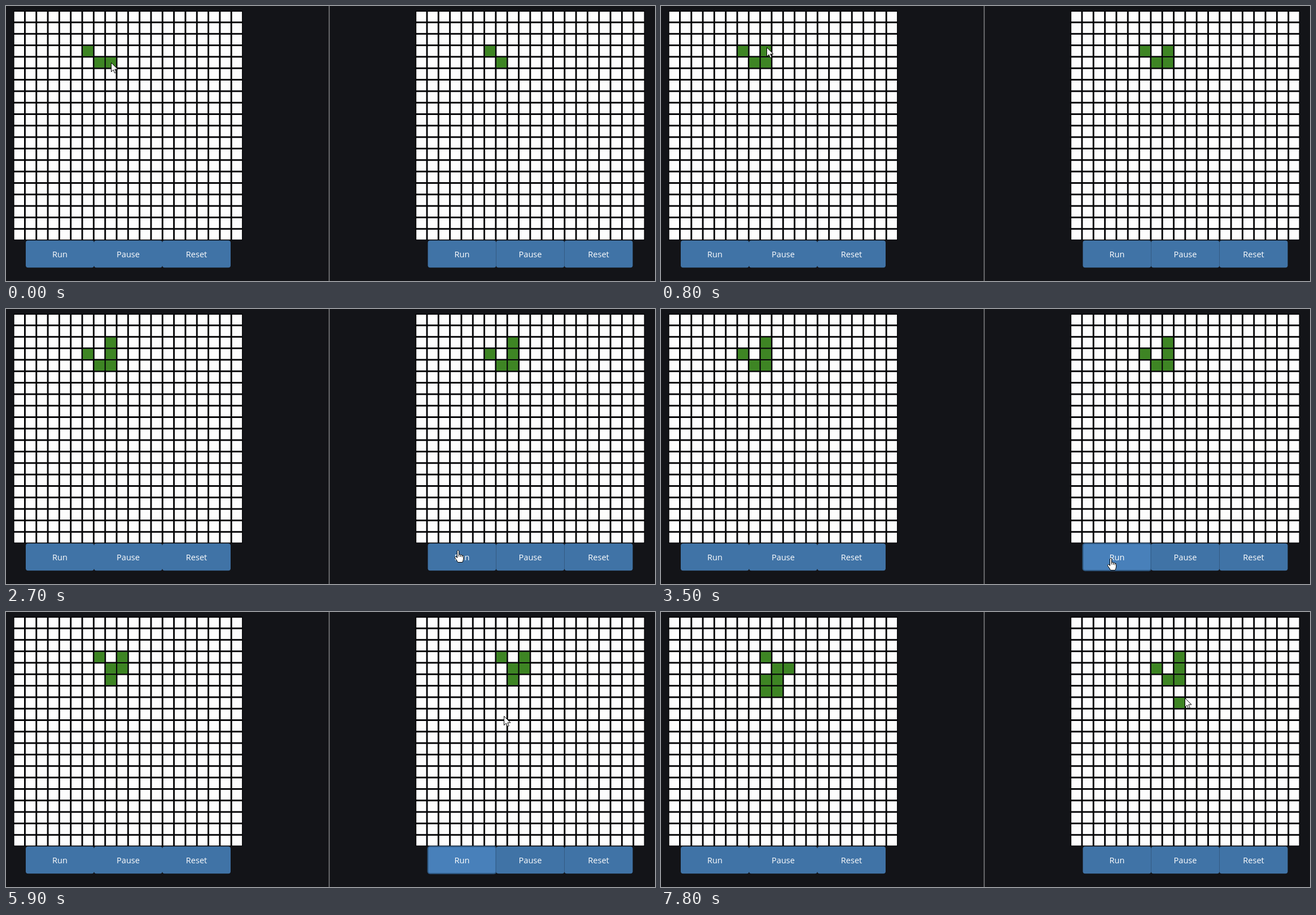
Recreate the animation shown at these times as an HTML page. Size 1150x487 px, loop 8000 ms.

```html
<!DOCTYPE html>
<html lang="en">
<head>
<meta charset="utf-8">
<title>Game of Life</title>
<style>
  html, body { margin: 0; height: 100%; overflow: hidden; background: #131418; }
  svg { display: block; }
  text { font: 14.6px "Open Sans", "Noto Sans", sans-serif; fill: #fff; text-anchor: middle; }
</style>
</head>
<body>
<svg id="stage" width="1150" height="487" viewBox="0 0 1150 487"></svg>
<script>
const LOOP = 8000, SIZE = 20, PITCH = 20.32, CELL = 17.4;
const stage = document.getElementById('stage');

function add(tag, attrs, text) {
  const el = document.createElementNS('http://www.w3.org/2000/svg', tag);
  for (const k in attrs) el.setAttribute(k, attrs[k]);
  if (text) el.textContent = text;
  return stage.appendChild(el);
}

// Board events: [time, column, row] clicks a cell, [time] advances one generation.
const boards = [
  { x: 14.6, start: [[6, 3], [7, 4], [8, 4]],
    events: [[600, 8, 3], [1300, 8, 2], [4200], [5200], [5900], [6900], [7800, 9, 7], [7800]] },
  { x: 727.1, start: [[6, 3], [7, 4]],
    events: [[200, 8, 4], [700, 8, 3], [1500, 8, 2], [3700], [4800], [5900], [6800], [7700, 9, 7]] }
];

// Pointer positions, each held until the next: [time, x, y]
const path = [
  [0, 186, 100], [100, 186, 97], [200, 187, 88], [300, 186, 79], [400, 186, 77],
  [500, 187, 75], [600, 187, 73], [900, 187, 70], [1000, 187, 64], [1100, 187, 57],
  [1200, 187, 54], [1800, 196, 60], [1900, 250, 88], [2000, 347, 132], [2300, 700, 311],
  [2700, 801, 427], [2800, 800, 433], [2900, 798, 438], [3000, 797, 441],
  [4000, 806, 446], [4200, 794, 439], [4800, 815, 413], [5000, 830, 394],
  [5900, 882, 184], [6000, 896, 170], [6800, 908, 162], [6900, 921, 155], [7000, 928, 152]
];

add('rect', { x: 571.8, width: 1.7, height: 487, fill: '#7b7b7d' });

for (const b of boards) {
  const span = SIZE * PITCH;
  add('rect', { x: b.x - 1.5, y: 8.5, width: span, height: span, fill: '#040406' });
  b.cells = [];
  for (let i = 0; i < SIZE * SIZE; i++) b.cells.push(add('rect', {}));
  b.buttons = ['Run', 'Pause', 'Reset'].map((label, i) => {
    const x = b.x + 20.4 + i * 121;
    const rect = add('rect', { x, y: 415.3, width: 121, height: 48, rx: 4, fill: '#4073a6' });
    add('text', { x: x + 60.5, y: 445 }, label);
    return rect;
  });
}

const run = boards[1].buttons[0];
const outline = { stroke: '#000', 'stroke-width': 1, 'stroke-linejoin': 'round', fill: '#fff' };
const arrow = add('path', { ...outline, d: 'M.5.5V16.5L4.2 13 6.6 18.7 9.2 17.6 6.8 12H12Z' });
const hand = add('path', { ...outline,
  d: 'M-1.5 1.5Q0-1 1.5 1.5V8Q3.3 6.4 4.4 8.6 6.2 7.3 7.2 9.5 9.6 8.6 9.6 11.5V15Q9.4 18 7.8 21.5H-.5' +
     'Q-2 18-5 14.5-6.3 12.2-4.5 11.4-3 11.3-1.5 13.5ZM1.5 8V11.5M4.4 8.6V12M7.2 9.5V12.5' });

const key = (c, r) => r * SIZE + c;

function nextGeneration(live) {
  const counts = {};
  for (const k of live) {
    const c = k % SIZE, r = (k - c) / SIZE;
    for (let dr = -1; dr <= 1; dr++)
      for (let dc = -1; dc <= 1; dc++)
        if (dr || dc) {
          const n = key(c + dc, r + dr);
          counts[n] = (counts[n] || 0) + 1;
        }
  }
  return new Set(Object.keys(counts).map(Number)
    .filter(k => counts[k] === 3 || (counts[k] === 2 && live.has(k))));
}

function drawBoard(b, t) {
  let live = new Set(b.start.map(p => key(...p)));
  for (const [at, c, r] of b.events) {
    if (at > t) break;
    if (c === undefined) live = nextGeneration(live);
    else live.add(key(c, r));
  }
  b.cells.forEach((el, k) => {
    const on = live.has(k), grow = on ? 0.4 : 0, c = k % SIZE, r = (k - c) / SIZE;
    el.setAttribute('x', b.x + c * PITCH - grow);
    el.setAttribute('y', 10.1 + r * PITCH - grow);
    el.setAttribute('width', CELL + 2 * grow);
    el.setAttribute('height', CELL + 2 * grow);
    el.setAttribute('fill', on ? '#3e8524' : '#fdfdfd');
  });
}

function draw(t) {
  boards.forEach(b => drawBoard(b, t));

  const lit = t >= 2800 && t < 7700, focused = t >= 3500 && t < 7700;
  run.setAttribute('fill', lit ? '#4880ba' : '#4073a6');
  run.setAttribute('stroke', focused ? '#2d567f' : 'none');
  run.setAttribute('stroke-width', 2);

  const [, x, y] = path.filter(p => p[0] <= t).pop();
  const overButton = y > 415;
  arrow.setAttribute('visibility', overButton ? 'hidden' : 'visible');
  hand.setAttribute('visibility', overButton ? 'visible' : 'hidden');
  (overButton ? hand : arrow).setAttribute('transform', `translate(${x} ${y})`);
}

const began = performance.now();
let shown = -1;
function tick() {
  const t = Math.floor((performance.now() - began) % LOOP / 100) * 100;
  if (t !== shown) draw(shown = t);
  requestAnimationFrame(tick);
}
tick();
</script>
</body>
</html>
```
